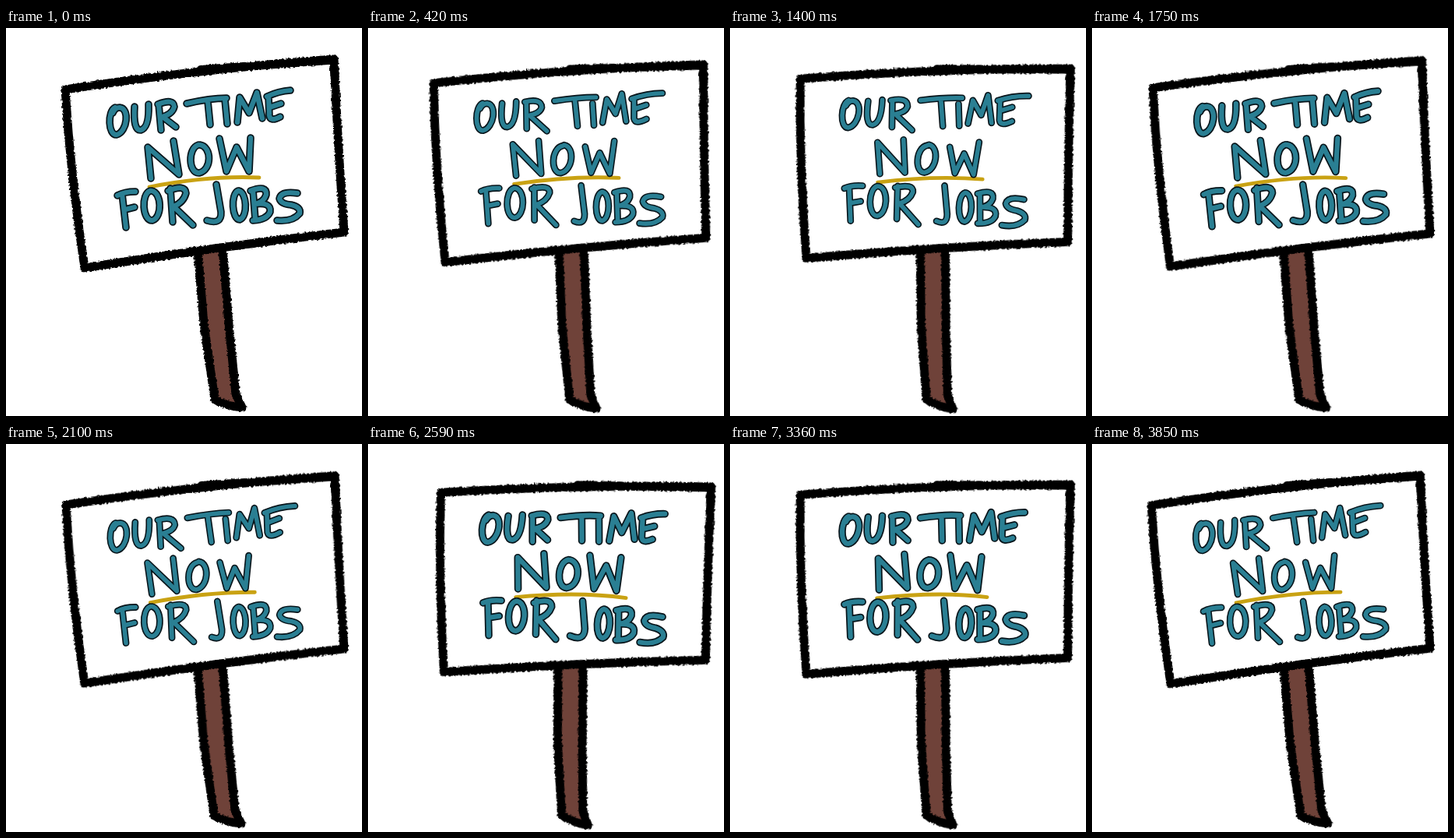
These frames come from a looping animation (457 by 498 pixels, 3920 ms). An HTML page:

```html
<!DOCTYPE html>
<html lang="en">
<head>
<meta charset="utf-8">
<title>Our time now for jobs</title>
<style>
  html, body { margin: 0; width: 100%; height: 100%; overflow: hidden; background: #fff; }
  svg { display: block; width: 457px; height: 498px; }
  path { fill: none; stroke-linecap: round; stroke-linejoin: round; }
  .frame { stroke: #000; stroke-width: 11; }
  .ink { stroke: #07141a; stroke-width: 9.6; }
  .paint { stroke: #2a7f93; stroke-width: 6.2; }
  .thin .ink { stroke-width: 8.8; }
  .thin .paint { stroke-width: 5.6; }
  .gold { stroke: #c9a213; stroke-width: 4.8; }
</style>
</head>
<body>
<svg viewBox="0 0 457 498" role="img" aria-label="Our time now for jobs">
  <defs>
    <filter id="rough" filterUnits="userSpaceOnUse" x="0" y="0" width="457" height="498" color-interpolation-filters="sRGB">
      <feTurbulence type="fractalNoise" baseFrequency=".35" numOctaves="2" seed="4"/>
      <feDisplacementMap in="SourceGraphic" scale="4" xChannelSelector="R" yChannelSelector="G"/>
    </filter>
  </defs>
  <g id="sign">
    <g filter="url(#rough)">
      <path class="frame" style="fill:#6f4239" d="M246 284L254 380L268 477Q285 486 303 487L295 470L286 380L278 282"/>
      <path class="frame" style="fill:#fff" d="M76 79Q245 53 421 40Q426 150 434 262Q268 281 101 308Q83 192 76 79Z"/>
      <path class="frame" d="M250 53.500L420 41L422 60"/>
    </g>
    <g id="bold"></g>
    <g id="thin" class="thin"></g>
  </g>
</svg>
<script>
const FRAME = 70, CYCLE = 28, LETTER_HOLD = 6, FRAMES = 56;
const $ = id => document.getElementById(id);

// Letter strokes common to both hand-drawn versions
const shared = [
  'M140 102C130 107 131 138 142 137C156 133 159 103 146 102Q140 102 137 109', // O
  'M165 101Q163 132 173 131Q184 128 183 98',                                // U
  'M149 213L154 256M143 215Q152 210 166 210M153 233L165 230',               // F
  'M185 209C173 213 175 248 188 247C201 243 200 211 187 209',               // O
  'M298 209C288 213 290 246 300 246C311 242 309 211 299 209',               // O
  'M317 208L320 246M314 209Q335 201 334 214Q331 224 319 226Q341 223 339 236Q335 246 317 247', // B
  'M374 212Q353 209 351 219Q353 226 366 227Q379 230 377 238Q368 249 348 247' // S
].join('');

const boldLetters = [
  'M196 98L199 131M195 98Q215 90 216 101Q214 110 201 114L218 127',          // R
  'M232 97Q262 90 283 90M259 94L262 124M281 92L284 123',                    // TI
  'M297 121L300 89L312 109L322 83L329 116',                                // M
  'M337 88L338 112Q339 121 352 114M341 101L353 97M335 88Q350 81 365 80',    // E
  'M186 193L182 153L222 188L215 145',                                      // N
  'M247 150C233 154 234 187 248 186C265 182 264 152 249 150',              // O
  'M274 142L283 184L296 153L312 184L314 141',                              // W
  'M211 206L214 249M208 209Q230 200 231 212Q228 224 215 229L240 253',       // R
  'M270 201L276 236Q277 253 258 247'                                      // J
].join('');

const thinLetters = [
  'M196 98L198 132M194 98Q215 92 216 104Q214 112 201 115L224 134',
  'M232 95Q262 89 285 88M258 92L263 126M281 96L284 124',
  'M295 120L299 90L311 108L318 82L325 117',
  'M334 87L335 113Q337 121 351 113M337 100L350 95M331 88Q350 80 370 79',
  'M187 193L181 153L219 189L214 147',
  'M245 152C230 156 231 188 244 187C260 183 261 153 247 151',
  'M274 152L283 185L293 159L307 185L311 143',
  'M211 207L213 249M208 209Q231 202 231 213Q228 224 215 229L241 254',
  'M271 202L277 238Q278 253 264 248'
].join('');

function letter(group, strokes, underline) {
  const path = (cls, d) => `<path class="${cls}" d="${d}"/>`;
  group.innerHTML = path('gold', underline) +
    path('ink', shared + strokes) + path('paint', shared + strokes);
}
letter($('bold'), boldLetters, 'M184 204Q262 189 325 192');
letter($('thin'), thinLetters, 'M185 204Q255 190 319 190');

function draw(now) {
  const n = Math.floor(now / FRAME) % FRAMES;
  const phase = 2 * Math.PI * n / CYCLE;
  // Lingers slightly on the left-hand side of the swing
  const swing = (1 - Math.cos(phase - 0.17 * Math.sin(phase))) / 2;
  $('sign').setAttribute('transform', `rotate(${8.1 * swing} 267 262)`);
  const isThin = Math.floor(n / LETTER_HOLD) % 2 === 1;
  $('bold').style.display = isThin ? 'none' : '';
  $('thin').style.display = isThin ? '' : 'none';
}

const start = performance.now();
function tick() {
  draw(performance.now() - start);
  requestAnimationFrame(tick);
}
tick();
</script>
</body>
</html>
```
